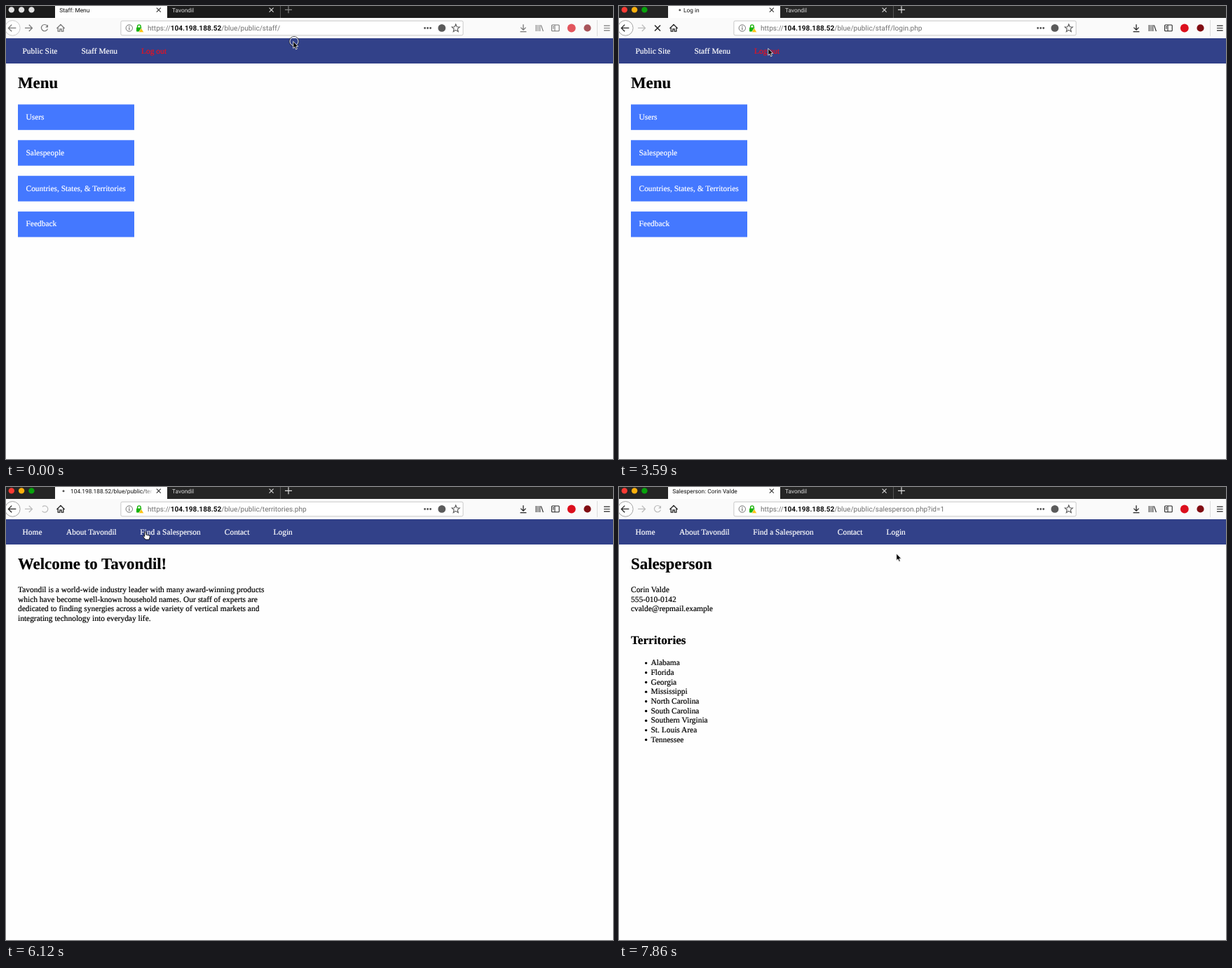
Animation of 866x646 px, one loop 8000 ms. Source, as an HTML page:

```html
<!DOCTYPE html>
<html lang="en">
<head>
<meta charset="utf-8">
<title>Browser session</title>
<style>
  html, body { margin: 0; width: 100%; height: 100%; overflow: hidden; background: #fefefe; }
  svg { display: block; width: 866px; height: 646px; }
  text { white-space: pre; text-rendering: geometricPrecision; fill: currentColor; }
  .page { font: 11.44px "Liberation Serif", "Times New Roman", serif; color: #000; }
  .page text { stroke: currentColor; stroke-width: .2px; }
  .ui { font: 8.35px Roboto, "Liberation Sans", sans-serif; }
  .url { font-size: 10.1px; }
  .link { color: #0000ee; text-decoration: underline; }
</style>
</head>
<body>
<svg id="stage" viewBox="0 0 866 646">
  <defs>
    <linearGradient id="fade">
      <stop offset="0" stop-color="#fefefe" stop-opacity="0"/>
      <stop offset="1" stop-color="#fefefe"/>
    </linearGradient>
  </defs>
  <g id="page" class="page"></g>
  <g id="chrome" class="ui"></g>
  <circle id="dot" cy="5.8" r="1.5" fill="#555"/>
  <g id="ring" fill="none">
    <circle cx="411" cy="50.5" r="6.9" stroke="#222" stroke-width=".9"/>
    <circle cx="411" cy="50.5" r="6" stroke="#fff" stroke-width=".9"/>
  </g>
  <g id="cursor">
    <path id="arrow" d="M0 0V9.8L2.2 7.8 3.8 11.4 5.5 10.6 4 7.2H7Z" fill="#000" stroke="#fff" stroke-width=".8"/>
    <path id="hand" d="M-1.2 .6Q0-1 1 .6V4L5.5 5Q6.6 5.4 6.2 7.6L5.2 11H0L-3.4 6.8Q-3.6 5-1.2 6.4Z" fill="#fff" stroke="#000" stroke-width=".9"/>
  </g>
</svg>
<script>
const LOOP = 8000, LINE = 13.68, LINE_GAP = 11.5;
const HOST = '104.198.188.52', BRAND = 'Tavondil', REP = 'Corin Valde';
const $ = id => document.getElementById(id);

const text = (x, y, s, attrs = '') => `<text x="${x}" y="${y}" ${attrs}>${s}</text>`;
const rect = (x, y, w, h, fill, attrs = '') =>
  `<rect x="${x}" y="${y}" width="${w}" height="${h}" fill="${fill}" ${attrs}/>`;
const circle = (x, y, r, fill, attrs = '') =>
  `<circle cx="${x}" cy="${y}" r="${r}" fill="${fill}" ${attrs}/>`;
const line = (d, color, width = 1.2) =>
  `<path d="${d}" fill="none" stroke="${color}" stroke-width="${width}"/>`;
const title = s => text(17, 117, s, 'font-size="22.88" font-weight="700"');
const lines = (x, y, list) => list.map((s, i) => text(x, y + i * LINE, s)).join('');

function navBar(items, width = 866) {
  return rect(0, 46, width, 36, '#324189') +
    items.map(([x, s, color = '#fff']) => text(x, 68.4, s, `color="${color}"`)).join('');
}
const publicNav = width => navBar([[23.5, 'Home'], [86, 'About ' + BRAND],
  [191.3, 'Find a Salesperson'], [311.8, 'Contact'], [381.5, 'Login']], width);

function menuPage() {
  const items = ['Users', 'Salespeople', 'Countries, States, &amp; Territories', 'Feedback'];
  return navBar([[23.5, 'Public Site'], [107.5, 'Staff Menu'], [193, 'Log out', '#f0101c']]) +
    title('Menu') + items.map((s, i) => {
      const y = 140.4 + i * 50.9;
      return rect(17, y, 166, 36.4, '#4478ff') + text(28.5, y + 21.3, s, 'color="#fff"');
    }).join('');
}

function loginPage() {
  const box = y => rect(17.4, y, 100.4, 14.6, '#fff', 'stroke="#666" stroke-width=".8"');
  const bullets = Array.from({ length: 12 }, (_, i) => circle(22.3 + i * 3.98, 191.2, 1.45, '#000')).join('');
  return navBar([[23.5, 'Public Site']]) + title('Log in') +
    text(17, 150, 'Username:') + box(154.3) + text(20, 164.6, 'ttester', 'class="ui"') +
    text(17, 179.2, 'Password:') + box(183.4) + bullets +
    rect(17.6, 200.3, 46.2, 11, '#fff', 'rx="2.2" stroke="#888" stroke-width=".8"') +
    text(41, 208.6, 'Submit', 'class="ui" text-anchor="middle"');
}

function welcomePage() {
  return publicNav() + title(`Welcome to ${BRAND}!`) + lines(17, 150, [
    BRAND + ' is a world-wide industry leader with many award-winning products',
    'which have become well-known household names. Our staff of experts are',
    'dedicated to finding synergies across a wide variety of vertical markets and',
    'integrating technology into everyday life.']);
}

function territoriesPage() {
  const [walter, clara, rosalind] = ['Walter Penridge', 'Clara Fenwyn', 'Rosalind Quenley'];
  const states = [
    ['Alabama (AL)', REP], ['Alaska (AK)', walter], ['Arizona (AZ)', clara],
    ['Arkansas (AR)', 'Josephine Arlen'],
    ['California (CA)', walter, 'Northern California', 'Nadine Holvast', 'Southern California'],
    ['Colorado (CO)', clara], ['Connecticut (CT)', rosalind], ['Delaware (DE)', rosalind],
    ['Florida (FL)', REP], ['Georgia (GA)', REP], ['Hawaii (HI)', clara]];
  let y = 200.8, out = '';
  for (const [state, ...entries] of states) {
    out += text(17, y, state);
    for (let i = 0; i < entries.length; i += 2) {
      y += LINE;
      out += rect(36.6, y - 5, 3.8, 3.8, '#000');
      if (entries[i + 1]) { out += text(45.5, y, entries[i + 1]); y += LINE; }
      out += text(45.5, y, entries[i], 'class="link"');
    }
    y += LINE + LINE_GAP;
  }
  return publicNav(860) + title('Find a Salesperson') +
    text(17, 150, 'Use the list below to find a salesperson nearby. We are ready to serve you!') +
    text(17, 175.2, 'UNITED STATES', 'font-weight="700"') + out +
    rect(860, 46, 6, 600, '#fafafa') + line('M860.5 46V646', '#e4e4e4', 1) +
    rect(862.8, 48, 4.5, 132, '#7d7d7d', 'rx="2"');
}

function salespersonPage() {
  const areas = ['Alabama', 'Florida', 'Georgia', 'Mississippi', 'North Carolina', 'South Carolina',
    'Southern Virginia', 'St. Louis Area', 'Tennessee'];
  return publicNav() + title('Salesperson') +
    lines(17, 150, [REP, '555-010-0142', 'cvalde@repmail.example']) +
    text(17, 224, 'Territories', 'font-size="17.16" font-weight="700"') +
    lines(45.5, 254.4, areas) +
    areas.map((_, i) => circle(38.6, 251.1 + i * LINE, 1.7, '#000')).join('');
}

const reloadIcons = {
  idle: c => line('M58.6 28.2A4.6 4.6 0 1 0 59.4 32.6', c) + `<path d="M60 26.4V30.4H56Z" fill="${c}"/>`,
  dim: () => reloadIcons.idle('#bbb'),
  stop: c => line('M51 27.5L59 35.5M59 27.5L51 35.5', c, 1.5),
  turning: () => line('M52 28.2A4.6 4.6 0 1 1 51.6 34.4', '#bbb')
};

function chrome(s) {
  const icon = s.active ? '#252525' : '#777';
  const bar = s.active ? '#252525' : '#1b1b1b';
  const lights = s.active ? ['#fc3b33', '#fdb00c', '#08a30c'] : ['#e2e2e2', '#e2e2e2', '#e2e2e2'];
  const close = (x, c) => line(`M${x - 3} 2.6l6 6m0-6l-6 6`, c, 1.1);
  return rect(0, 0, 866, 17, bar) +
    lights.map((c, i) => circle(7.8 + i * 14.3, 5.4, 4.2, c)).join('') +
    rect(70, 0, 160, 17, '#fefefe') +
    text(s.loading ? 92 : 76.3, 9, s.title, 'color="#111"') +
    rect(196, 0, 14, 17, 'url(#fade)') + rect(210, 0, 20, 17, '#fefefe') + close(217.8, '#333') +
    rect(230, 0, 10, 17, bar) +
    text(237, 9, BRAND, 'color="#ddd"') + close(378.6, '#ddd') +
    line('M391.5 0V17', '#555', 1) + line('M398 5.3h10m-5-5v10', s.active ? '#ddd' : '#888', 1.2) +
    rect(0, 17, 866, 29, '#fafafa') +
    circle(9.3, 31.4, 10.8, '#fefefe', `stroke="${s.active ? '#999' : '#c4c4c4'}" stroke-width=".9"`) +
    line('M14.3 31.4H3.6M8.2 26.6L3.4 31.4 8.2 36.2', icon, 1.3) +
    line('M27 31.4H37.4M32.8 26.8L37.4 31.4 32.8 36', s.forward ? icon : '#bbb', 1.3) +
    reloadIcons[s.reload](icon) +
    line('M72.4 32L78 26.4 83.6 32M74.2 31V36.2H76.8V32.8H79.2V36.2H81.8V31', icon, 1.3) +
    rect(163.9, 21.2, 488.2, 20.6, '#fff', 'rx="2" stroke="#c8c8c8" stroke-width="1"') +
    circle(175.8, 31.5, 4.7, 'none', 'stroke="#666" stroke-width=".9"') +
    line('M175.8 30.6V34.2M175.8 28.6V29.8', '#666', 1.1) +
    line('M187.6 31V29.2A2.3 2.3 0 0 1 192.2 29.2V31', '#18b30a', 1.4) +
    rect(186, 30.6, 7.6, 6, '#18b30a', 'rx=".8"') +
    '<path d="M193 31.4L196.6 37.4H189.4Z" fill="#ffc20a" stroke="#fff" stroke-width=".6"/>' +
    text(202, 35, `https://<tspan font-weight="700" color="#111" fill="#111">${HOST}</tspan>/blue/public/${s.url}`,
      'class="url" color="#707070"') +
    [597.6, 601.6, 605.6].map(x => circle(x, 31.5, 1.4, '#555')).join('') +
    circle(621.8, 31.4, 5.4, '#5b5b5b') +
    line('M641.7 26L643.3 29.7 647.3 30 644.2 32.6 645.2 36.6 641.7 34.4 638.2 36.6 639.2 32.6 636.1 30 640.1 29.7Z', '#555', 1.1) +
    line('M738 26.2V34M734.4 30.6L738 34.2 741.6 30.6M733.6 36.6H742.4', icon, 1.3) +
    line('M756.3 27V36M759 27V36M761.7 27V36M763.4 27.4L766.4 36', icon, 1.1) +
    rect(778.6, 27, 10.6, 8.8, 'none', `rx="1" stroke="${icon}" stroke-width="1.1"`) +
    line('M783 27V36M780 29.4H782M780 31.4H782', icon, 1) +
    circle(806.8, 31.5, 5.9, s.active ? '#dc0f1d' : '#e2555d') +
    circle(829.5, 31.4, 5.1, s.active ? '#800c12' : '#a8545a') +
    line('M843.5 20V43', '#ddd', 1) +
    line('M853 28.2H861.6M853 31.5H861.6M853 34.8H861.6', icon, 1.2);
}

// Each entry overrides the state before it.
const idle = { loading: 0, reload: 'idle' };
const scenes = [
  [0, { page: menuPage, title: 'Staff: Menu', url: 'staff/', active: false, forward: true, ...idle }],
  [2860, { active: true }],
  [3010, { loading: 3010, reload: 'stop' }],
  [3440, { title: 'Log in', url: 'staff/login.php', forward: false }],
  [3740, { reload: 'turning' }],
  [3890, { page: loginPage, loading: 0, reload: 'dim' }],
  [4340, idle],
  [4780, { loading: 4780, reload: 'stop' }],
  [4930, { title: HOST + '/blue/public/index.php', url: 'index.php', reload: 'turning' }],
  [5080, { page: welcomePage }],
  [5230, { title: BRAND, loading: 0, reload: 'dim' }],
  [5680, idle],
  [5970, { loading: 5970, reload: 'stop' }],
  [6120, { title: HOST + '/blue/public/territories.php', url: 'territories.php', reload: 'turning' }],
  [6270, { page: territoriesPage, title: 'Find a Salesperson', loading: 0, reload: 'dim' }],
  [6780, idle],
  [7220, { loading: 7220, reload: 'stop' }],
  [7370, { title: HOST + '/blue/public/salesperson.php', url: 'salesperson.php?id=1', reload: 'turning' }],
  [7520, { page: salespersonPage, title: 'Salesperson: ' + REP, loading: 0, reload: 'dim' }]
];
let current = {};
const states = scenes.map(([time, change]) => [time, current = { ...current, ...change }]);

// Pointer: time, x, y, hand shape
const pointer = [
  [0, 409.8, 50.5], [140, 510, 150], [350, 609, 244], [640, 520, 268], [790, 340, 200], [940, 190, 110],
  [1090, 105, 52], [1390, 60, 42], [1540, 28, 38], [1680, 17.6, 36.5], [1830, 12, 31], [1980, 25, 38],
  [2130, 60, 52], [2270, 100, 62], [2420, 128, 60], [2560, 212.8, 60.5], [4040, 200, 64], [4190, 165, 66],
  [4340, 115, 65], [4490, 73, 63], [4630, 52.8, 62.3], [5230, 62, 62], [5380, 108, 63], [5530, 165, 63],
  [5680, 199, 64, 1], [6630, 93.6, 223.5], [6780, 82, 214], [6920, 75, 207, 1], [7710, 230, 95], [7860, 395.8, 95]
];
const at = (track, t) => track.findLast(entry => entry[0] <= t);

let shownPage, shownState;
function draw(t) {
  const state = at(states, t)[1];
  if (state !== shownState) $('chrome').innerHTML = chrome(shownState = state);
  if (state.page !== shownPage) $('page').innerHTML = (shownPage = state.page)();
  $('dot').style.display = state.loading ? '' : 'none';
  $('dot').setAttribute('cx', 86 - 4 * Math.sin((t - state.loading) * Math.PI / 300));
  const [, x, y, hand] = at(pointer, t);
  $('cursor').setAttribute('transform', `translate(${x} ${y})`);
  $('arrow').style.display = hand ? 'none' : '';
  $('hand').style.display = hand ? '' : 'none';
  $('ring').style.display = t < 140 ? '' : 'none';
}

const start = performance.now();
function tick() {
  draw((performance.now() - start) % LOOP);
  requestAnimationFrame(tick);
}
tick();
</script>
</body>
</html>
```
